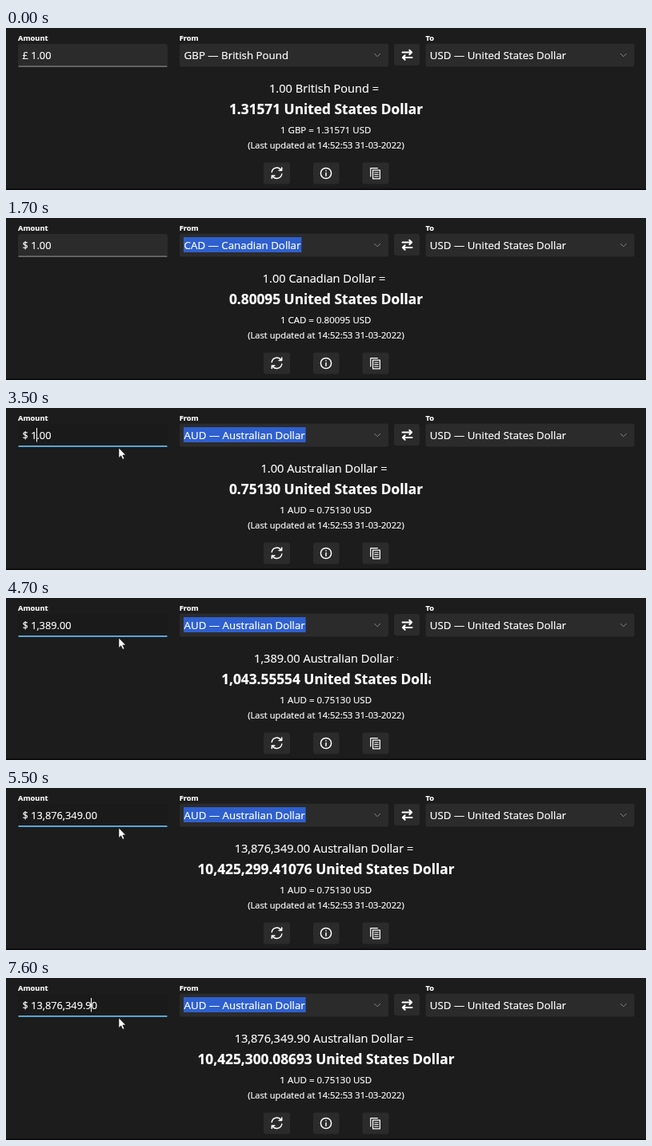
Animation of 800x203 px, one loop 8000 ms. Source, as an HTML page:

```html
<!DOCTYPE html>
<html lang="en">
<head>
<meta charset="utf-8">
<title>Currency converter</title>
<style>
  html, body { margin: 0; width: 100%; height: 100%; overflow: hidden; background: #1c1c1c; }
  svg { display: block; width: 100%; height: 100%; }
  text { font-family: "Open Sans", "Noto Sans", sans-serif; fill: #fff; stroke: #fff; stroke-width: .2; }
  .label { font-size: 9.3px; font-weight: 700; }
  .field { font-size: 13.3px; }
  #amount { font-size: 12.8px; }
  .box { fill: #2b2b2b; }
  .icon { fill: none; stroke: #fff; stroke-width: 1.5; stroke-linecap: round; stroke-linejoin: round; }
  .swap { stroke-width: 2; }
  .thin { stroke-width: 1.2; }
  .chevron { fill: none; stroke: #858585; stroke-width: 1; }
  #head { font-size: 14.6px; }
  #result { font-size: 17.3px; font-weight: 700; }
  #rate { font-size: 11.5px; }
  #updated { font-size: 11.15px; }
  .mid { text-anchor: middle; }
</style>
</head>
<body>
<svg viewBox="0 0 800 203" xmlns="http://www.w3.org/2000/svg">
  <defs>
    <clipPath id="headClip"><rect y="60" height="28"/></clipPath>
    <clipPath id="resultClip"><rect y="90" height="26"/></clipPath>
  </defs>
  <rect width="800" height="203" fill="#1c1c1c"/>
  <rect y="201.5" width="800" height="1.5" fill="#090707"/>

  <text class="label" x="15" y="16.2">Amount</text>
  <text class="label" x="216.7" y="16.2">From</text>
  <text class="label" x="524.5" y="16.2">To</text>

  <rect id="amountBox" x="15" y="20" width="187" height="28.5" rx="3"/>
  <rect id="underline" x="15.5" width="186"/>
  <text id="amount" x="20.5" y="39"></text>
  <rect id="caret" y="25" width="1" height="17.5" fill="#fff"/>

  <rect class="box" x="217" y="19.5" width="261" height="29" rx="3"/>
  <rect id="mark" x="222" y="24" height="19" fill="#2f60cf"/>
  <text id="from" class="field" x="222.6" y="39"></text>
  <path class="chevron" d="M460.4 32l3.8 3.8 3.8-3.8"/>

  <rect class="box" x="485" y="20" width="32" height="27" rx="3"/>
  <path class="icon swap" d="M495.5 30.5H506.5M504.3 27.7l2.8 2.8-2.8 2.8M507.5 37H496.5M498.7 34.2l-2.8 2.8 2.8 2.8"/>

  <rect class="box" x="524.5" y="19.5" width="261" height="29" rx="3"/>
  <text class="field" x="529.8" y="39">USD — United States Dollar</text>
  <path class="chevron" d="M768 32l3.8 3.8 3.8-3.8"/>

  <g clip-path="url(#headClip)"><text id="head" y="81"></text></g>
  <g clip-path="url(#resultClip)"><text id="result" y="108"></text></g>
  <text id="rate" class="mid" x="399.7" y="132.3"></text>
  <text id="updated" class="mid" x="400" y="151.3">(Last updated at 14:52:53 31-03-2022)</text>

  <g class="box">
    <rect x="322" y="168.5" width="33" height="27" rx="3"/>
    <rect x="384" y="168.5" width="32.5" height="27" rx="3"/>
    <rect x="445.5" y="168.5" width="33" height="27" rx="3"/>
  </g>
  <g class="icon">
    <path d="M332.2 180.5a6.4 6.4 0 0 1 11.8-2.3M344.7 175v3.6h-3.6M344.8 183a6.4 6.4 0 0 1-11.8 2.3M332.3 188.6V185h3.6"/>
    <circle cx="400" cy="182" r="6.6"/>
    <path d="M400 181.6v3.6M400 178.8v.1"/>
    <path class="thin" d="M455.8 186V175.6h8.6M458.6 178.2h8.8v10.6h-8.8zM460.8 181h4.4M460.8 183.5h4.4M460.8 186h4.4"/>
  </g>

  <path id="cursor" fill="#fff" stroke="#111" stroke-width=".6"
    d="M141 50v12.4l2.8-2.6 2 4.5 2.1-.9-2-4.4h3.7z"/>
</svg>
<script>
const LOOP = 8000;
const $ = id => document.getElementById(id);

// code: [name, symbol, rate in USD]
const currencies = {
  GBP: ["British Pound", "£", 1.31571],
  EUR: ["Euro", "€", 1.1126],
  DKK: ["Danish Krone", "Kr", 0.14956],
  CZK: ["Czech Koruna", "Kč", 0.04551],
  CNY: ["Chinese Renminbi Yuan", "¥", 0.15746],
  CHF: ["Swiss Franc", "Fr", 1.07747],
  CAD: ["Canadian Dollar", "$", 0.80095],
  BRL: ["Brazilian Real", "R$", 0.21013],
  BGN: ["Bulgarian Lev", "лв", 0.56887],
  AUD: ["Australian Dollar", "$", 0.75129988520468]
};

// time, selected code, converted code, amount, amount the labels are still sized for
const steps = [
  [0, "GBP", "GBP", 1],
  [800, "EUR", "EUR", 1],
  [900, "DKK", "DKK", 1],
  [1000, "CZK", "DKK", 1],
  [1100, "CZK", "CZK", 1],
  [1200, "CNY", "CNY", 1],
  [1300, "CHF", "CHF", 1],
  [1700, "CAD", "CAD", 1],
  [1800, "BRL", "CAD", 1],
  [1900, "BRL", "BRL", 1],
  [2000, "BGN", "BGN", 1],
  [2100, "AUD", "AUD", 1],
  [4700, "AUD", "AUD", 1389, 138],
  [4800, "AUD", "AUD", 13879, 1389],
  [4900, "AUD", "AUD", 138769, 13879],
  [5000, "AUD", "AUD", 1387649, 138769],
  [5100, "AUD", "AUD", 13876349],
  [7300, "AUD", "AUD", 13876349.9]
];

// time, characters before the caret (0 = hidden)
const carets = [
  [0, 0], [3100, 3], [3600, 0], [4000, 3], [4500, 0], [5100, 10], [5500, 0],
  [5900, 11], [6100, 12], [6300, 13], [6700, 0], [7300, 14]
];

const at = (list, t) => list.filter(s => s[0] <= t).pop();
const show = (el, on) => el.setAttribute("visibility", on ? "visible" : "hidden");
const set = (el, attrs) => { for (const k in attrs) el.setAttribute(k, attrs[k]); };
const format = (n, digits) => n.toLocaleString("en-US",
  { minimumFractionDigits: digits, maximumFractionDigits: digits });

const headText = (n, code) => `${format(n, 2)} ${currencies[code][0]} =`;
const resultText = (n, code) => `${format(n * currencies[code][2], 5)} United States Dollar`;

// Centres a label's box; while the box is too small the text is cut at the right.
function placeLabel(id, text, oldText, trailing) {
  const el = $(id);
  el.textContent = oldText || text;
  const width = el.getComputedTextLength() + trailing;
  const left = 400 - width / 2;
  el.textContent = text;
  set(el, { x: left });
  set($(id + "Clip").firstChild, { x: left - 1, width: width + 1 });
}

let current;
function applyStep(step) {
  if (step === current) return;
  current = step;
  const [, picked, code, n, oldN] = step;
  const [, symbol, rate] = currencies[code];
  $("amount").textContent = `${symbol} ${format(n, 2)}`;
  $("from").textContent = `${picked} — ${currencies[picked][0]}`;
  $("rate").textContent = `1 ${code} = ${rate.toFixed(5)} USD`;
  set($("mark"), { width: $("from").getComputedTextLength() + 1.5 });
  show($("mark"), step !== steps[0]);
  placeLabel("head", headText(n, code), oldN && headText(oldN, code), 5);
  placeLabel("result", resultText(n, code), oldN && resultText(oldN, code), 0);
}

function render(t) {
  applyStep(at(steps, t));

  const focused = t >= 3100;
  set($("amountBox"), { fill: focused ? "#1a1a1a" : t >= 3000 ? "#313131" : "#2b2b2b" });
  set($("underline"), focused
    ? { y: 47, height: 1.8, fill: "#62b5ea" }
    : { y: 47.6, height: 1, fill: "#9c9c9c" });

  const pos = at(carets, t)[1];
  show($("caret"), pos);
  if (pos) set($("caret"), { x: Math.round($("amount").getEndPositionOfChar(pos - 1).x - 0.5) });

  show($("cursor"), t >= 3500);
}

const start = performance.now();
function tick() {
  render((performance.now() - start) % LOOP);
  requestAnimationFrame(tick);
}
tick();
</script>
</body>
</html>
```
